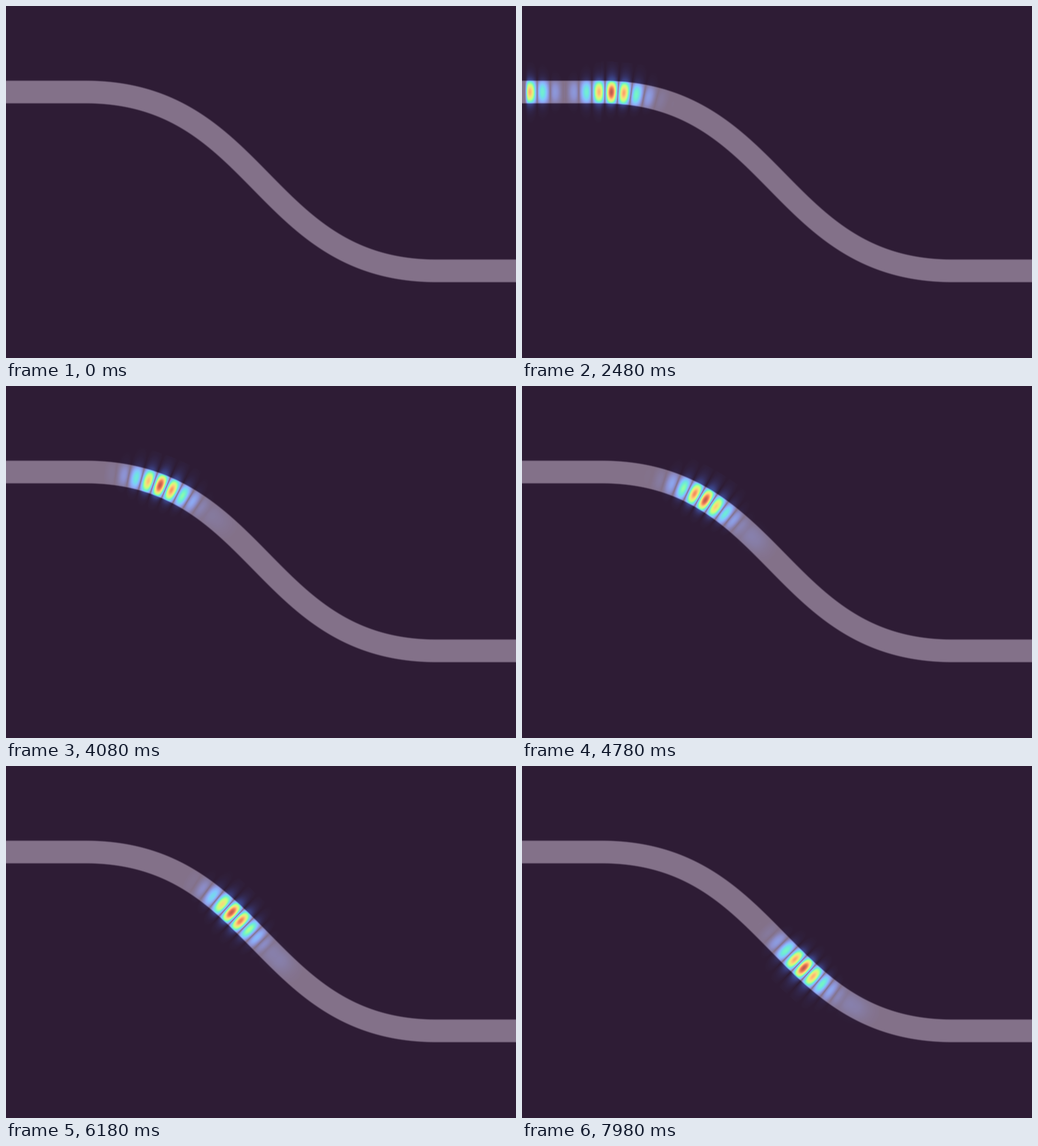
An HTML page with a canvas for the animation above (8 s loop, 900 px wide and 622 px high).

```html
<!DOCTYPE html>
<html lang="en">
<head>
<meta charset="utf-8">
<title>Pulse in a waveguide bend</title>
<style>
  html, body { margin: 0; width: 100%; height: 100%; overflow: hidden; background: #2e1c34; }
  canvas { display: block; width: 900px; height: 622px; }
</style>
</head>
<body>
<canvas id="stage" width="900" height="622"></canvas>
<script>
const W = 900, H = 622, LOOP = 8000;
const ctx = document.getElementById('stage').getContext('2d');
const clamp = (v, lo, hi) => Math.min(hi, Math.max(lo, v));

// Rainbow colour scale, evenly spaced stops expanded to 512 entries
const stops = ['30123b', '4145ab', '4675ed', '39a2fc', '1bcfd4', '24eca6', '61fc6c', 'a4fc3b',
  'd1e834', 'f3c63a', 'fe9b2d', 'f36315', 'd93806', 'b11901', '7a0402']
  .map(h => [0, 2, 4].map(i => parseInt(h.slice(i, i + 2), 16)));
const scale = Array.from({ length: 512 }, (_, i) => {
  const p = i / 511 * (stops.length - 1), k = Math.min(p | 0, stops.length - 2);
  return stops[k].map((c, j) => c + (stops[k + 1][j] - c) * (p - k));
});

// Centre line: straight, cubic S-bend, straight; s is arc length from x = 0
const path = [];
function addPoint(x, y, dx, dy) {
  const last = path[path.length - 1], len = Math.hypot(dx, dy);
  const s = last ? last.s + Math.hypot(x - last.x, y - last.y) : x;
  path.push({ x, y, s, tx: dx / len, ty: dy / len });
}
for (let x = -60; x < 140; x += 4) addPoint(x, 152, 1, 0);
for (let t = 0; t <= 1.0001; t += 0.005) {
  addPoint(140 + 930 * t * (1 - t) + 620 * t ** 3, 152 + 316 * t * t * (3 - 2 * t),
    930 * (1 - 2 * t) + 1860 * t * t, 1896 * t * (1 - t));
}
for (let x = 764; x <= 960; x += 4) addPoint(x, 468, 1, 0);

// Distance along and across the guide for every pixel near it
const REACH = 54;
const nearest = new Float32Array(W * H).fill(REACH * REACH);
const along = new Float32Array(W * H), across = new Float32Array(W * H);
for (const p of path) {
  const x1 = Math.min(W, p.x + REACH), y1 = Math.min(H, p.y + REACH);
  for (let y = Math.max(0, Math.floor(p.y - REACH)); y < y1; y++) {
    for (let x = Math.max(0, Math.floor(p.x - REACH)); x < x1; x++) {
      const dx = x + 0.5 - p.x, dy = y + 0.5 - p.y, d = dx * dx + dy * dy, i = y * W + x;
      if (d >= nearest[i]) continue;
      nearest[i] = d;
      along[i] = p.s + dx * p.tx + dy * p.ty;
      across[i] = dy * p.tx - dx * p.ty;
    }
  }
}

const HALF = 20, MID = 500;
const image = ctx.createImageData(W, H), data = image.data;
function paint(i, v, cover) {
  const c = scale[Math.round(clamp(v, 0, 1) * 511)];
  const alpha = 0.6 + 0.1 * v, under = (43 + 212 * cover) * (1 - alpha), o = i * 4;
  for (let k = 0; k < 3; k++) data[o + k] = c[k] * alpha + under;
  data[o + 3] = 255;
}

// Mode profile across the guide, with a longer tail on the outside of a bend
const cells = [];
for (let i = 0; i < W * H; i++) {
  const off = across[i], r = Math.abs(off), near = nearest[i] < REACH * REACH;
  const cover = near ? clamp((HALF + 1.2 - r) / 2.4, 0, 1) : 0;
  paint(i, 0, cover);
  if (!near) continue;
  const s = along[i];
  const bend = s > 140 && s < 860 ? clamp((MID - s) / 120, -1, 1) : 0;
  const decay = 9 - 2.5 * bend * Math.sign(off);
  const inner = Math.cos(1.25 * Math.min(r, HALF) / HALF);
  const outer = 0.15 * Math.exp(-Math.max(0, r - HALF) / decay);
  const mode = (inner * cover + outer * (1 - cover)) * clamp((s - 5) / 5, 0, 1);
  cells.push({ i, s, cover, mode });
}
const base = new Uint8ClampedArray(data);

const SOURCE = 75, LOBE = 23.1, SIGMA = 32;
function field(s, n) {
  const q = SOURCE + Math.abs(s - SOURCE);
  const d = q - (218 + 7.4 * (n - 31));
  const late = clamp((n - 31) / 15, 0, 1);
  const front = Math.min(Math.max(0, d - 25), 60);
  const phase = Math.PI * (q - 111 - 11.63 * (n - 15)) / LOBE + late * 0.0005 * front * front;
  const pulse = 0.95 * Math.exp(-d * d / (2 * SIGMA * SIGMA)) * Math.abs(Math.cos(phase));
  const precursor = 0.035 * late * Math.exp(-(((d - 112) / 28) ** 2));
  return pulse + precursor;
}

function draw(n) {
  data.set(base);
  if (n > 0) {
    const centre = 218 + 7.4 * (n - 31);
    for (const c of cells) {
      if (c.s > Math.max(centre, SOURCE) + 190) continue;
      const v = field(c.s, n) * c.mode;
      if (v > 0.002) paint(c.i, v, c.cover);
    }
  }
  ctx.putImageData(image, 0, 0);
}

let shown = -1;
function tick() {
  const t = performance.now() % LOOP;
  const n = t < 280 ? 0 : Math.floor((t - 180) / 100);
  if (n !== shown) draw(shown = n);
  requestAnimationFrame(tick);
}
tick();
</script>
</body>
</html>
```
